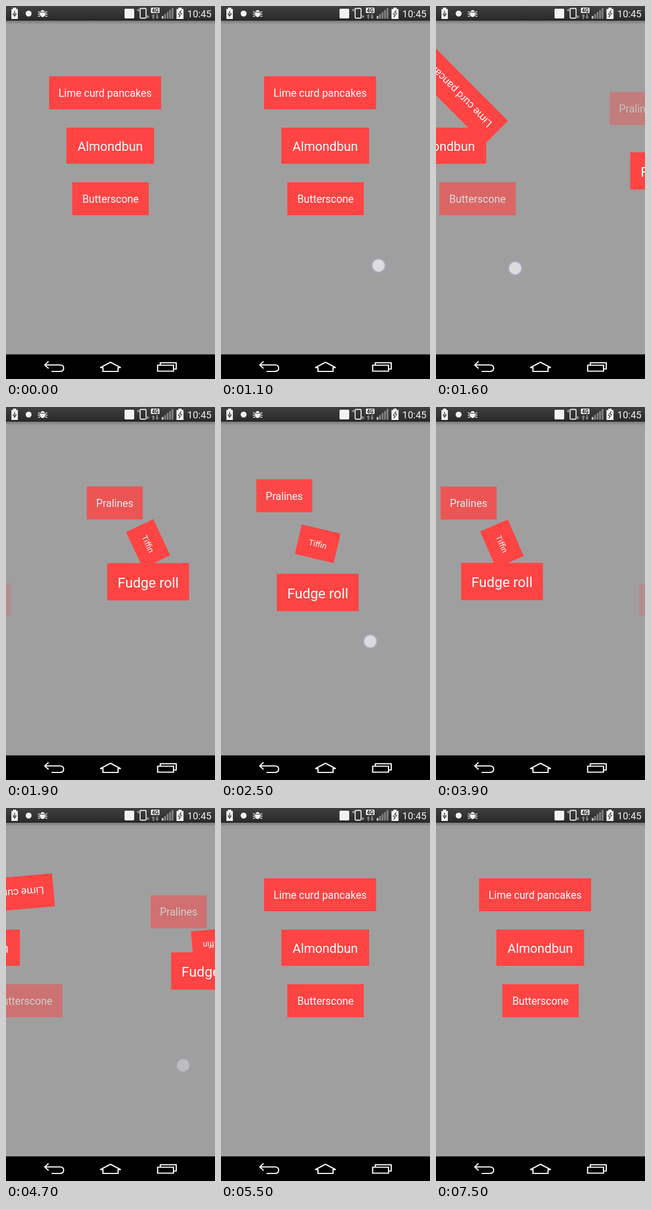
Recreate the animation shown at these times as an HTML page. Size 388 by 690 pixels, loop 8000 ms.

```html
<!DOCTYPE html>
<html lang="en">
<head>
<meta charset="utf-8">
<title>Pager with moving tiles</title>
<style>
  html, body { margin: 0; width: 100%; height: 100%; overflow: hidden; background: #9f9f9f; }
  #stage { position: relative; width: 388px; height: 690px; overflow: hidden; background: #9f9f9f; font-family: Roboto, sans-serif; }
  .tile { position: absolute; box-sizing: border-box; padding-top: 2px; display: flex; align-items: center; justify-content: center; background: #ff4444; color: #fff; white-space: nowrap; }
  #bars { position: absolute; left: 0; top: 0; }
  #finger { position: absolute; left: -17px; top: -17px; width: 34px; height: 34px; border-radius: 50%;
    background: radial-gradient(circle, #dcdce0 0 10.5px, #b4b2c2 11.5px, rgba(160, 158, 174, .75) 14px, rgba(159, 159, 165, 0) 17px); }
</style>
</head>
<body>
<div id="stage">
  <div id="pages"></div>
  <div id="finger"></div>
  <svg id="bars" width="388" height="690" viewBox="0 0 388 690" font-family="Roboto, sans-serif">
    <defs>
      <linearGradient id="top" x2="0" y2="1"><stop stop-color="#404040"/><stop offset="1" stop-color="#292929"/></linearGradient>
      <linearGradient id="shade" x2="0" y2="1"><stop stop-color="#000" stop-opacity=".25"/><stop offset="1" stop-color="#000" stop-opacity="0"/></linearGradient>
    </defs>
    <rect width="388" height="27" fill="url(#top)"/>
    <rect y="26" width="388" height="1" fill="#181818"/>
    <rect y="27" width="388" height="7" fill="url(#shade)"/>
    <rect y="644.500" width="388" height="46"/>

    <g fill="#f2f2f2">
      <path d="M13 3h6v2.500h3V24H10V5.500h3z"/>
      <path d="M16 9v11M13.500 13v3l2.500 2 2.500-2v-3" fill="none" stroke="#2a2a2a" stroke-width="1.300"/>
      <circle cx="42" cy="14" r="5.500"/>
      <ellipse cx="68" cy="14" rx="5" ry="6.500"/>
      <path d="M59.500 10.500l4 1.500M59 15h4M59.500 19.500l4-1.500M76.500 10.500l-4 1.500M77 15h-4M76.500 19.500l-4-1.500" stroke="#f2f2f2" stroke-width="1.500"/>
      <path d="M63 11.500h10" stroke="#2a2a2a"/>
      <rect x="220" y="5" width="18" height="18" rx="2"/>
      <rect x="249" y="4.500" width="11" height="18" rx="1.500" fill="none" stroke="#f2f2f2" stroke-width="1.800"/>
      <path d="M246.500 5v5M244.300 6v3M262.500 17v5.500M264.800 18v3.500" stroke="#ccc" stroke-width="1.200"/>
      <rect x="269" y="3" width="16" height="10" rx="1.500"/>
      <text x="277" y="11.700" font-size="10" font-weight="700" text-anchor="middle" fill="#222">4G</text>
      <path id="data" d="M273.500 15l3.500 4h-2.200v5h-2.600v-5H270zM280.500 24l-3.500-4h2.200v-5h2.600v5h2.200z"/>
      <g id="signal" fill="#828282"></g>
      <path d="M320 3h6v2.500h3.500V24h-13V5.500h3.500z"/>
      <path d="M325 8l-5.500 7.500h3L321 21l5.500-7.500h-3z" fill="none" stroke="#2a2a2a"/>
      <text x="359" y="20.500" font-size="18" text-anchor="middle">10:45</text>
    </g>

    <g fill="none" stroke="#fff" stroke-width="2.200">
      <path d="M79 657.500L72 664l7 6.500M72 664h28q7 0 7 6t-7 6H84.500"/>
      <path d="M175 669L194 659l19 10h-5v7h-28v-7z"/>
      <path d="M281.500 664.500h29.500v11h-29.500zM286.500 664v-4H316v11.500h-5"/>
    </g>
  </svg>
</div>

<script>
const LOOP = 8000, STEP = 100, WIDTH = 388, SLOP = 17;
const $ = id => document.getElementById(id);
const clamp = v => Math.max(0, Math.min(1, v));
const bump = p => Math.sin(Math.PI * Math.abs(p));
const fade = p => 1 - Math.abs(p);

// text, x, y, width, height, font size, motion by page position
const sweets = [
  ["Lime curd pancakes", 80, 130, 208, 61, 19.4, p => ({ turn: -360 * Math.abs(p) })],
  ["Almondbun", 112, 225, 163, 67, 23.7, p => ({ speed: 1.25 })],
  ["Butterscone", 123, 326, 142, 61, 19.4, p => ({ speed: 0.804, alpha: fade(p) })]
];
const treats = [
  ["Pralines", 80, 130, 104, 61, 19.4, p => ({ dy: 31.5 * bump(p), alpha: fade(p) })],
  ["Tiffin", 157, 225, 74, 56, 15.1, p => ({ turn: 360 * Math.abs(p) })],
  ["Fudge roll", 118, 314, 152, 69, 25.9, p => ({ dy: -47 * bump(p) })]
];

function makeTile([text, x, y, w, h, size, move]) {
  const el = document.createElement("div");
  el.className = "tile";
  el.textContent = text;
  el.style.cssText = `left:${x}px;top:${y}px;width:${w}px;height:${h}px;font-size:${size}px`;
  $("pages").append(el);
  return { el, move };
}
const pages = [sweets, treats, sweets].map(set => set.map(makeTile));

for (let i = 0; i < 5; i++) {
  const h = 5 + i * 3.7;
  $("signal").insertAdjacentHTML("beforeend",
    `<rect x="${289 + i * 4.6}" y="${23.5 - h}" width="3.4" height="${h}"${i ? "" : ' fill="#c4c4c4"'}/>`);
}

// time, scroll in pages, 1 = settle after release
const scrollKeys = [
  [0, 0], [1100, 0], [1600, 0.375], [1800, 0.56], [2300, 1, 1],
  [2400, 1], [2500, 1.037], [2700, 1.4], [3200, 2, 1],
  [3500, 2], [3800, 1.45], [4300, 1, 1],
  [4400, 1], [4600, 0.567], [4700, 0.514], [5200, 0, 1], [LOOP, 0]
];
// down, drag start, up, x, y at down, y at up, direction
const strokes = [
  [900, 1100, 1800, 309.5, 478, 487, -1],
  [2200, 2400, 2700, 308.4, 436, 432, -1],
  [3350, 3500, 3800, 105, 470, 474, 1],
  [4250, 4400, 4650, 133.5, 468, 476, 1]
];

function scrollAt(t) {
  const i = scrollKeys.findIndex(k => k[0] > t);
  const [t0, a] = scrollKeys[i - 1], [t1, b, settle] = scrollKeys[i];
  const u = (t - t0) / (t1 - t0);
  return a + (b - a) * (settle ? 1 - (1 - u) ** 4 : u);
}

function drawPage(tiles, p) {
  for (const { el, move } of tiles) {
    const { speed = 1, dy = 0, turn = 0, alpha = 1 } = move(p);
    el.style.visibility = Math.abs(p) < 1 ? "visible" : "hidden";
    el.style.opacity = clamp(alpha);
    el.style.transform = `translate(${p * WIDTH * speed}px, ${dy}px) rotate(${turn}deg)`;
  }
}

function drawFinger(t) {
  const stroke = strokes.find(([down, , up]) => t >= down && t < up + 100);
  $("finger").style.opacity = 0;
  if (!stroke) return;
  const [down, drag, up, x, y0, y1, dir] = stroke;
  const now = Math.min(t, up);
  const slop = dir * SLOP * clamp((now - down) / (drag - down));
  const pulled = now > drag ? WIDTH * (scrollAt(drag) - scrollAt(now)) : 0;
  const y = y0 + (y1 - y0) * (now - down) / (up - down);
  $("finger").style.opacity = t > up ? 1 - (t - up) / 100 : clamp((t - down + 50) / 100);
  $("finger").style.transform = `translate(${x + slop + pulled}px, ${y}px)`;
}

function draw(t) {
  const scroll = scrollAt(t);
  pages.forEach((tiles, i) => drawPage(tiles, i - scroll));
  drawFinger(t);
  $("data").setAttribute("fill", t >= 3200 && t < 3500 ? "#f2f2f2" : "#858585");
}

const start = performance.now();
function tick() {
  const t = (performance.now() - start) % LOOP;
  draw(Math.floor(t / STEP) * STEP);
  requestAnimationFrame(tick);
}
tick();
</script>
</body>
</html>
```
